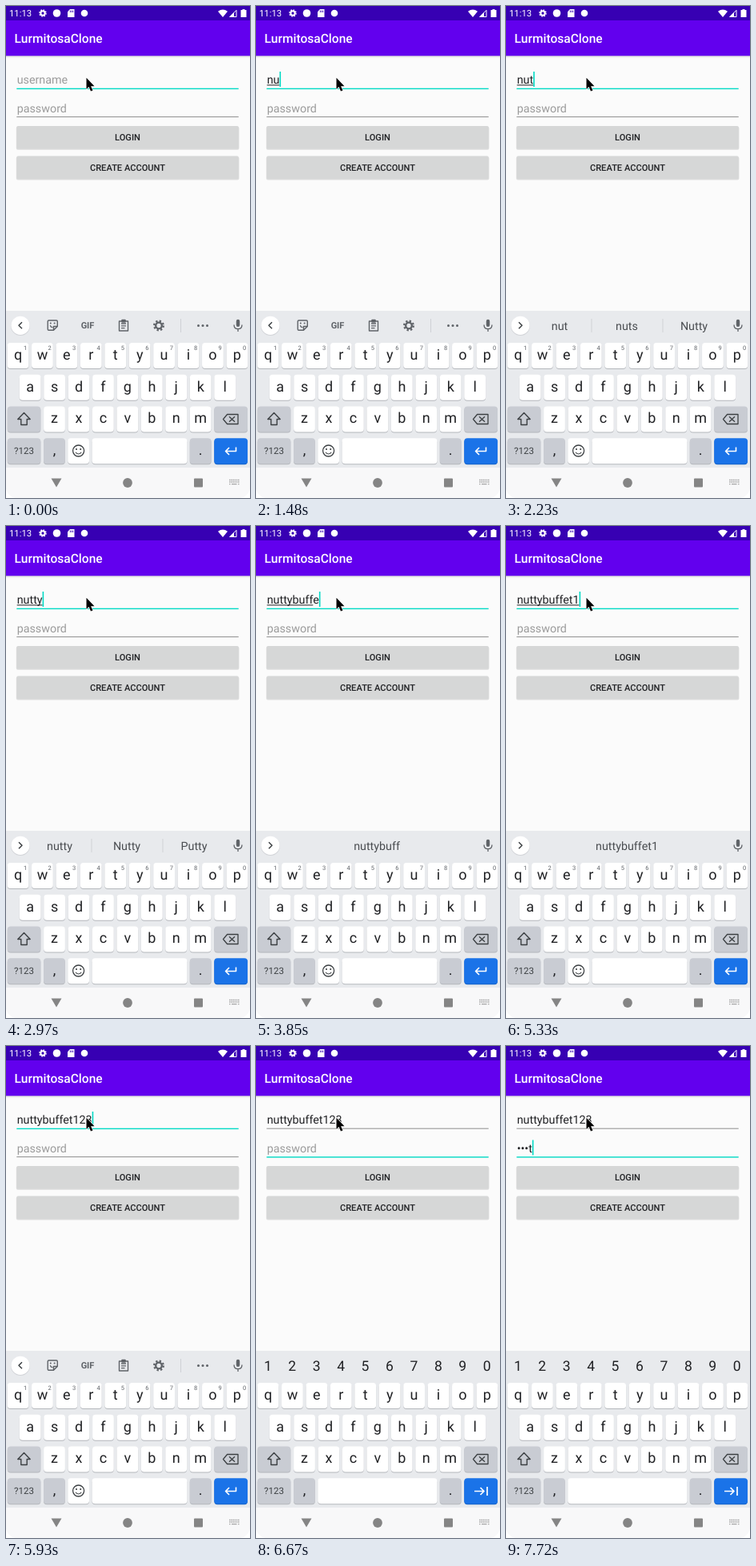
Animation, 305 px wide and 615 px high, one loop 8 s. Source, as an HTML page:

```html
<!DOCTYPE html>
<html lang="en">
<head>
<meta charset="utf-8">
<title>Login form</title>
<style>
  html, body { margin: 0; width: 100%; height: 100%; overflow: hidden; background: #fff; }
  svg { display: block; width: 305px; height: 615px; border-radius: 0 0 14px 14px; font-family: Roboto, sans-serif; text-rendering: geometricPrecision; }
  text { white-space: pre; }
</style>
</head>
<body>
<svg id="stage" viewBox="0 0 305 615"></svg>
<script>
const NS = 'http://www.w3.org/2000/svg';
const stage = document.getElementById('stage');
const INK = '#202124', GREY = '#5f6368', TEAL = '#03dac5', HINT = '#9b9b9b';
const PITCH = 30.43, TEXT_X = 13.7, FIELD_SIZE = 14.3;
const LOOP = 8000;

function add(parent, tag, attrs, content) {
  const el = document.createElementNS(NS, tag);
  for (const name in attrs) el.setAttribute(name, attrs[name]);
  if (content !== undefined) el.textContent = content;
  parent.append(el);
  return el;
}
const group = (parent = stage) => add(parent, 'g', {});
const rect = (p, x, y, width, height, fill, rx = 0) => add(p, 'rect', { x, y, width, height, fill, rx });
const circle = (p, cx, cy, r, fill) => add(p, 'circle', { cx, cy, r, fill });
const shape = (p, d, fill) => add(p, 'path', { d, fill });
const line = (p, d, stroke, width = 1.4) =>
  add(p, 'path', { d, stroke, 'stroke-width': width, fill: 'none', 'stroke-linejoin': 'round' });
const label = (p, str, x, y, size, fill = INK, weight = 400, anchor = 'middle') =>
  add(p, 'text', { x, y, 'font-size': size, fill, 'font-weight': weight, 'text-anchor': anchor }, str);
const show = (el, on) => el.setAttribute('display', on ? 'inline' : 'none');

function gear(p, cx, cy, r, color, ring) {
  const teeth = 2 * Math.PI * r / 16;
  add(p, 'circle', { cx, cy, r, fill: 'none', stroke: color, 'stroke-width': r * .4, 'stroke-dasharray': teeth });
  add(p, 'circle', { cx, cy, r: r * .66, fill: 'none', stroke: color, 'stroke-width': ring });
}

function drawBars() {
  const fade = add(add(stage, 'defs', {}), 'linearGradient', { id: 'fade', x2: 0, y2: 1 });
  add(fade, 'stop', { offset: 0, 'stop-opacity': .15 });
  add(fade, 'stop', { offset: 1, 'stop-opacity': 0 });
  rect(stage, 0, 0, 305, 615, '#fbfbfb');
  rect(stage, 0, 62, 305, 3, 'url(#fade)');
  rect(stage, 0, 0, 305, 62.3, '#6200ee');
  rect(stage, 0, 0, 305, 18, '#3700b3');
  label(stage, '11:13', 4, 12.8, 11.3, '#fff', 400, 'start');
  gear(stage, 46, 9, 4, '#fff', 2);
  circle(stage, 63.5, 9, 4.8, '#fff');
  shape(stage, 'M80 4H85.5V14H77V7.2Z', '#fff');
  line(stage, 'M80.3 5.5V8M82 5.5V8M83.7 5.5V8', '#3700b3', .8);
  circle(stage, 98, 9, 4.3, '#fff');
  shape(stage, 'M265 6.8Q271 2 277 6.8L271 14Z', '#fff');
  line(stage, 'M279.8 13.5L288 5.3V13.5Z', '#fff', 1);
  shape(stage, 'M279 14L285 8V14Z', '#fff');
  shape(stage, 'M293.5 5H295.5V4H298.5V5H300.5V14H293.5Z', '#fff');
  label(stage, 'LurmitosaClone', 10.5, 46, 15.56, '#fff', 500, 'start');
}

function button(str, y) {
  rect(stage, 12.8, y + .8, 278.6, 29, '#000', 2).setAttribute('opacity', .12);
  rect(stage, 13.3, y, 277.4, 28.6, '#d6d7d7', 1.6);
  label(stage, str, 152, y + 18, 11.1, INK, 500);
}

function makeField(hint, baseline) {
  const hintText = label(stage, hint, TEXT_X, baseline, FIELD_SIZE, HINT, 400, 'start');
  const text = label(stage, '', TEXT_X, baseline, FIELD_SIZE, INK, 400, 'start');
  const composing = rect(stage, TEXT_X, baseline + 1.4, 0, 1, INK);
  const rule = rect(stage, 13.3, 0, 277.4, 1, TEAL);
  const caret = rect(stage, TEXT_X, baseline - 15, 1.6, 19, TEAL);
  return (value, focused, caretOn, underlined = 0) => {
    text.textContent = value;
    show(hintText, !value);
    composing.setAttribute('width', underlined ? text.getSubStringLength(0, underlined) : 0);
    rule.setAttribute('y', baseline + 5.7);
    rule.setAttribute('height', focused ? 1.4 : .9);
    rule.setAttribute('fill', focused ? TEAL : '#828282');
    caret.setAttribute('x', TEXT_X + (value ? text.getComputedTextLength() : 0));
    show(caret, focused && caretOn);
  };
}

function key(p, x, y, width, fill = '#fff') {
  rect(p, x, y + .9, width, 32, fill === '#1a73e8' ? '#1763c6' : '#b4b7bc', 4);
  return rect(p, x, y, width, 32, fill, 4);
}

function drawKeyboard() {
  const DARK = '#c9ccd3';
  const rowY = row => 421 + row * 39.75;
  const BASE = 20.9, SHIFT_Y = rowY(2), LAST_Y = rowY(3);
  rect(stage, 0, 381, 305, 196, '#e8eaed');
  rect(stage, 0, 577, 305, 38, '#f8f8f9');
  const normal = group(), secure = group();

  [['qwertyuiop', 15], ['asdfghjkl', 30.2], ['zxcvbnm', 60.5]].forEach(([letters, x], row) => {
    [...letters].forEach((letter, i) => {
      const cx = x + i * PITCH;
      key(stage, cx - 13.4, rowY(row), 26.8);
      label(stage, letter, cx, rowY(row) + BASE, 18);
    });
  });
  key(stage, 1.8, SHIFT_Y, 41.5, DARK);
  line(stage, 'M22.5 508.5L14.8 516.5H18.8V523.5H26.2V516.5H30.2Z', '#3c4043');
  key(stage, 260.3, SHIFT_Y, 41.7, DARK);
  line(stage, 'M276.5 510.5H290V522.5H276.5L271.5 516.5ZM279 513.2L286 519.8M286 513.2L279 519.8', '#3c4043', 1.3);

  key(stage, 1.8, LAST_Y, 41.5, DARK);
  label(stage, '?123', 22.5, 560.3, 11.5, '#3c4043');
  key(stage, 47, LAST_Y, 26.8, DARK);
  label(stage, ',', 60.5, LAST_Y + BASE, 18);
  const space = key(group(), 107.5, LAST_Y, 119);
  const spaceShadow = space.previousSibling;
  key(stage, 229.8, LAST_Y, 26.8, DARK);
  label(stage, '.', 243, LAST_Y + BASE, 18);
  key(stage, 260.3, LAST_Y, 41.7, '#1a73e8');

  const enter = group(), tab = group();
  line(enter, 'M287.5 551.5V556.5H274.5M279 552L274.5 556.5L279 561', '#fff', 1.6);
  line(tab, 'M273 556.5H285M280.5 552L285 556.5L280.5 561M289 551V562', '#fff', 1.7);

  const emoji = group();
  key(emoji, 77.2, LAST_Y, 26.8);
  add(emoji, 'circle', { cx: 90.6, cy: 556, r: 7, fill: 'none', stroke: '#3c4043', 'stroke-width': 1.3 });
  circle(emoji, 88, 554, 1.1, '#3c4043');
  circle(emoji, 93.2, 554, 1.1, '#3c4043');
  line(emoji, 'M87 557.8Q88.3 560 90.6 560T94.2 557.8', '#3c4043', 1.2);

  const corner = group();
  [...'1234567890'].forEach((digit, i) => {
    label(corner, digit, 24.2 + i * PITCH, 430, 7.5, GREY);
    label(secure, digit, 14.8 + i * PITCH, 406, 17.5);
  });

  // Strip above the keys: tools or word suggestions
  circle(normal, 18, 400, 12, '#d2d4d8');
  circle(normal, 18, 399.3, 11.6, '#fff');
  rect(normal, 287.8, 391.8, 4.4, 9.2, GREY, 2.2);
  line(normal, 'M285 398.5Q285 403.7 290 403.7T295 398.5M290 403.7V407', GREY, 1.3);

  const tools = group(normal), words = group(normal);
  line(tools, 'M20 395.3L16 399.3L20 403.3', '#3c4043', 1.5);
  line(tools, 'M53.5 393H63Q64.3 393 64.3 394.3V400.5L59.5 405.3H53.5Q52.2 405.3 52.2 404V394.3Q52.2 393 53.5 393ZM64 400.5H59.5V405', GREY, 1.4);
  line(tools, 'M55.3 399.2Q56 402 58.6 401.6', GREY, 1.2);
  circle(tools, 55.8, 396.6, 1, GREY);
  circle(tools, 60.6, 396.6, 1, GREY);
  label(tools, 'GIF', 102, 403, 11, GREY, 700);
  line(tools, 'M141.5 394H152.5V406H141.5ZM144 397H150', GREY);
  rect(tools, 144.2, 391.8, 5.6, 4, GREY, 1);
  line(tools, 'M144 399.8H150M144 402.7H148.5', GREY, 1.2);
  gear(tools, 191, 399.5, 5.8, GREY, 2.4);
  rect(tools, 218, 391, 1, 17, '#cfd1d5');
  [240.5, 246, 251.5].forEach(x => circle(tools, x, 399.5, 1.5, GREY));

  line(words, 'M16 395.3L20 399.3L16 403.3', '#3c4043', 1.5);
  const dividers = group(words);
  [106.5, 195.5].forEach(x => rect(dividers, x, 391, 1, 17, '#cfd1d5'));
  const slots = [67, 151, 235].map(x => label(words, '', x, 404.8, FIELD_SIZE, '#4a4d51'));

  // Navigation bar
  shape(stage, 'M56.5 590.5H69.5L63 601.5Z', '#858585');
  circle(stage, 152, 596, 5.9, '#858585');
  rect(stage, 235, 590.5, 11, 11, '#858585', 1);
  [592.5, 595].forEach(y => add(stage, 'path', { d: `M279 ${y}H291.5`, stroke: '#a5a5a5', 'stroke-width': 1.4, 'stroke-dasharray': '1.5 .7' }));
  line(stage, 'M279 597.6H280.5M282 597.6H288.5M290 597.6H291.5', '#a5a5a5', 1.4);

  return (isSecure, suggestions) => {
    [normal, emoji, corner, enter].forEach(el => show(el, !isSecure));
    [secure, tab].forEach(el => show(el, isSecure));
    [space, spaceShadow].forEach(el => {
      el.setAttribute('x', isSecure ? 77.2 : 107.5);
      el.setAttribute('width', isSecure ? 149.3 : 119);
    });
    show(tools, !suggestions);
    show(words, !!suggestions);
    const list = suggestions || [];
    show(dividers, list.length === 3);
    const placed = list.length === 1 ? ['', list[0], ''] : list;
    slots.forEach((slot, i) => slot.textContent = placed[i] || '');
  };
}

const NAME = 'nuttybuffet123';
const start = n => NAME.slice(0, n);

// typed: letters in the name; under: letters underlined; words: suggestions
const STEPS = [
  [0, { typed: 0, under: 0, caret: false, words: null, pass: '', onPass: false, secure: false }],
  [140, { caret: true }],
  [590, { caret: false }],
  [1190, { typed: 1, under: 1, caret: true }],
  [1340, { typed: 2 }],
  [1480, { under: 2 }],
  [1630, { words: ['nu', 'nut', 'nudge'] }],
  [2080, { typed: 3 }],
  [2230, { under: 3, words: ['nut', 'nuts', 'Nutty'] }],
  [2520, { typed: 4 }],
  [2670, { under: 4, words: ['nutt', 'nutty', 'Nutty'] }],
  [2820, { typed: 5 }],
  [2970, { under: 5, words: ['nutty', 'Nutty', 'Putty'] }],
  [3110, { typed: 6 }],
  [3260, { under: 6, words: [start(6)] }],
  [3410, { typed: 7 }],
  [3560, { under: 7, words: [start(7)] }],
  [3700, { typed: 9 }],
  [3850, { typed: 10, under: 9, words: [start(9)] }],
  [4000, { typed: 11, under: 10, words: [start(10)] }],
  [4140, { under: 11, words: [start(11)] }],
  [4740, { caret: false }],
  [5040, { typed: 12, caret: true }],
  [5330, { under: 12, words: [start(12)] }],
  [5630, { typed: 14, under: 13, words: [start(13)] }],
  [5930, { under: 0, words: null }],
  [6230, { onPass: true }],
  [6370, { secure: true }],
  [6670, { caret: false }],
  [6970, { pass: 'n', caret: true }],
  [7120, { pass: '•u' }],
  [7270, { pass: '••t' }],
  [7720, { pass: '•••t' }]
];
let state = {};
const timeline = STEPS.map(([time, change]) => ({ time, ...(state = { ...state, ...change }) }));

drawBars();
const setName = makeField('username', 97);
const setPass = makeField('password', 132.5);
button('LOGIN', 150);
button('CREATE ACCOUNT', 187.6);
const setKeyboard = drawKeyboard();
add(stage, 'path', {
  d: 'M100.5 89.7V104L103.6 101.1L106 106.6L108.5 105.5L106.1 100.2H110.5Z',
  fill: '#000', stroke: '#fff', 'stroke-width': 1.1, 'paint-order': 'stroke'
});

let current;
function render(now) {
  const t = now % LOOP;
  const next = timeline.findLast(step => step.time <= t);
  if (next !== current) {
    current = next;
    setName(start(next.typed), !next.onPass, next.caret, next.under);
    setPass(next.pass, next.onPass, next.caret);
    setKeyboard(next.secure, next.words);
  }
}
const origin = performance.now();
function tick() {
  render(performance.now() - origin);
  requestAnimationFrame(tick);
}
tick();
</script>
</body>
</html>
```
